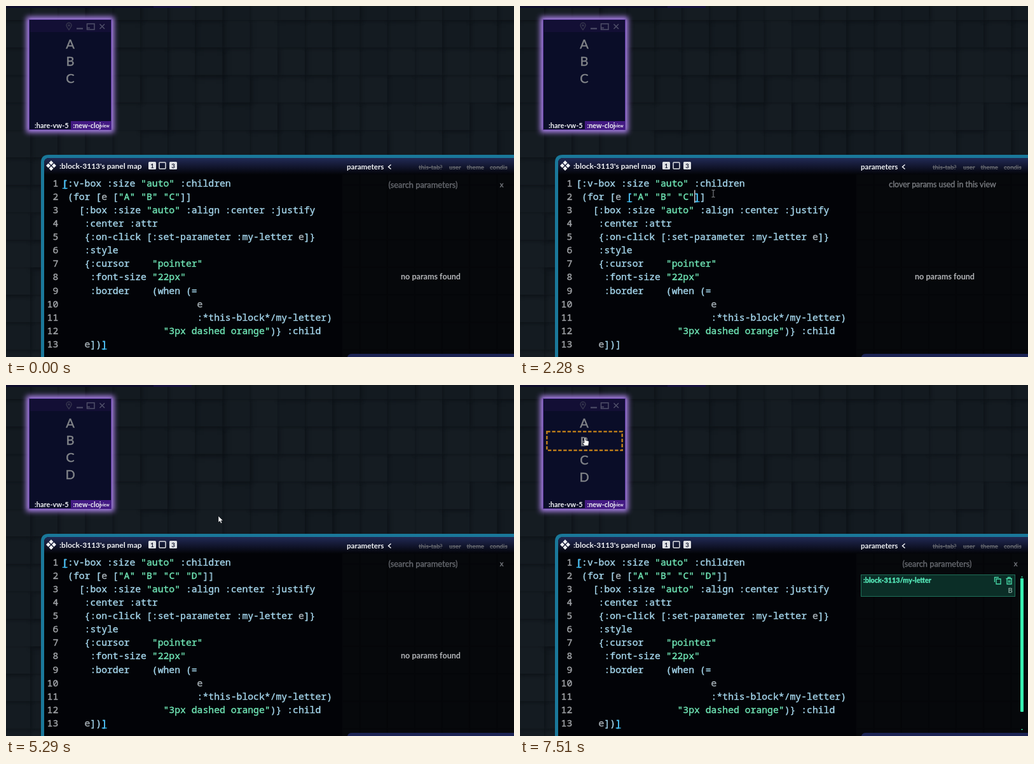
Recreate the animation shown at these times as an HTML page with a canvas. Size 799 by 552 pixels, loop 8000 ms.

```html
<!DOCTYPE html>
<html lang="en">
<head>
<meta charset="utf-8">
<title>Panel editor</title>
<style>
html, body { margin: 0; width: 100%; height: 100%; overflow: hidden; background: #141b21; }
canvas, svg { position: absolute; left: 0; top: 0; display: block; }
text { white-space: pre; font-family: Lato, sans-serif; color: #f0f2f5; fill: currentColor; }
tspan { fill: currentColor; }
.b { font-weight: 700; }
.mid { text-anchor: middle; }
.firm, .code text, .code tspan { stroke: currentColor; stroke-width: .4px; }
.code text { font: 500 14.75px "Noto Sans Mono", "DejaVu Sans Mono", monospace; color: #a5d6ec; }
.code .str { color: #70e6b6; }
.code .sym { color: #a9b3b9; }
.code .num { color: #a2a5a9; text-anchor: end; }
.code .mark text { color: #3cbcf4; }
.mark rect { fill: #3cbcf4; }
.letters text { font-size: 20px; color: #83868a; text-anchor: middle; }
.tabs text { font-size: 9.7px; font-weight: 700; color: #62656d; text-decoration: line-through; }
.glow { position: absolute; left: 36px; top: 21px; width: 128px; height: 172px; border: 1.5px solid #51308f;
  background: #0a0d28; box-shadow: 0 0 8px 4px #b086f0; }

.step { animation: 8s step-end infinite; }
.focus { animation-name: focus; }
.blur { animation-name: blur; }
@keyframes focus { 0% { opacity: 0 } 26.6% { opacity: 1 } 61.85% { opacity: 0 } }
@keyframes blur { 0% { opacity: 1 } 26.6% { opacity: 0 } 61.85% { opacity: 1 } }
@keyframes pair { 0% { opacity: 0 } 26.6% { opacity: 1 } 43.5% { opacity: 0 } }
@keyframes tail {
  0% { transform: none } 35.7% { transform: translateX(8.85px) }
  43.5% { transform: translateX(26.55px) } 48.3% { transform: translateX(35.4px) }
}
@keyframes caret {
  0% { transform: none; opacity: 0 } 26.6% { transform: none; opacity: 1 }
  33.5% { transform: none; opacity: 0 } 35.7% { transform: translateX(8.85px); opacity: 1 }
  42.3% { transform: translateX(8.85px); opacity: 0 } 43.5% { transform: translateX(17.7px); opacity: 1 }
  48.3% { transform: translateX(26.55px); opacity: 1 } 55.1% { transform: translateX(26.55px); opacity: 0 }
}
@keyframes quotes { 0% { opacity: 0 } 43.5% { opacity: 1 } 48.3% { opacity: 0 } }
@keyframes typed { 0% { opacity: 0 } 48.3% { opacity: 1 } }
@keyframes fourth { 0% { opacity: 0 } 66.1% { opacity: 1 } }
@keyframes picked { 0% { opacity: 0 } 92.5% { opacity: 1 } }
@keyframes unpicked { 0% { opacity: 1 } 92.5% { opacity: 0 } }
@keyframes nudge { 0% { transform: none } 92.5% { transform: translateY(2px) } }
@keyframes push { 0% { transform: none } 92.5% { transform: translateY(4px) } }

.mouse { animation: mouse 8s infinite linear; }
@keyframes mouse {
  0%, 9.1% { transform: translate(782px, 408px); animation-timing-function: ease-out }
  11.5%, 15% { transform: translate(427px, 149px); animation-timing-function: ease-in }
  18% { transform: translate(300px, 205px) }
  20% { transform: translate(226px, 266px) }
  21.9% { transform: translate(248px, 295px); animation-timing-function: ease-out }
  23.5%, 27.2% { transform: translate(277px, 300px) }
  28.5%, 58.3% { transform: translate(304px, 295px); animation-timing-function: ease-in-out }
  61.2%, 74.1% { transform: translate(334px, 206px) }
  74.6%, 79.3% { transform: translate(337px, 215px); animation-timing-function: ease-in-out }
  82.2%, 82.6% { transform: translate(159px, 64px); animation-timing-function: ease-out }
  86.6%, 100% { transform: translate(102px, 83px) }
}
@keyframes arrow { 0% { opacity: 0 } 9.1% { opacity: 1 } 20% { opacity: 0 } 59.7% { opacity: 1 } 83% { opacity: 0 } }
@keyframes beam { 0% { opacity: 0 } 20% { opacity: 1 } 59.7% { opacity: 0 } }
@keyframes hand { 0% { opacity: 0 } 83% { opacity: 1 } }
@keyframes click {
  0% { opacity: 0 } 13.7% { opacity: 1 } 15.6% { opacity: 0 } 25.7% { opacity: 1 } 27.2% { opacity: 0 }
  61.85% { opacity: 1 } 64% { opacity: 0 } 89.85% { opacity: 1 } 91.9% { opacity: 0 }
}
</style>
</head>
<body>
<canvas id="wall" width="799" height="552"></canvas>
<div class="glow"></div>
<svg width="799" height="552" viewBox="0 0 799 552">
  <defs>
    <linearGradient id="bar" x2="0" y2="1">
      <stop stop-color="#222a55"/><stop offset=".55" stop-color="#11152c"/><stop offset="1" stop-color="#030408"/>
    </linearGradient>
  </defs>
  <rect width="292" height="3" fill="#0d0d2b"/>
  <rect x="232" width="60" height="3" fill="#16123f"/>

  <!-- small view -->
  <rect x="38" y="23" width="127" height="18" fill="#130f35"/>
  <g fill="none" stroke="#50506a" stroke-width="1.5">
    <path d="M99 37.5Q95 32 95 30.5A4 4 0 0 1 103 30.5Q103 32 99 37.5Z" stroke="#35354d"/>
    <circle cx="99" cy="30.5" r="1" stroke="#35354d"/>
    <path d="M111 35.5H121" stroke-width="2"/>
    <path d="M127.5 28H139V37H127.5ZM128 34.5H132"/>
    <path d="M147.5 28.5L155 36M155 28.5L147.5 36"/>
  </g>
  <g class="letters">
    <text x="101" y="67" class="firm">A</text>
    <text x="101" y="94" class="firm step" style="animation-name:nudge">B</text>
    <g class="step" style="animation-name:push">
      <text x="101" y="121" class="firm">C</text>
      <text x="101" y="148" class="firm step" style="animation-name:fourth">D</text>
    </g>
  </g>
  <rect class="step" style="animation-name:picked" x="42.3" y="73.3" width="118.4" height="29.4" fill="none"
    stroke="#b87a1a" stroke-width="2.6" stroke-dasharray="5.4 2.7"/>
  <rect x="102" y="181" width="63" height="14" fill="#431a83"/>
  <text x="45" y="192" class="b" font-size="11">:hare-vw-5</text>
  <text x="105.5" y="192" class="b" font-size="10.8">:new-cloj</text>
  <text x="149" y="191" class="b" font-size="6.5">view</text>

  <!-- editor panel -->
  <path d="M55 552V246Q55 234 67 234H799V552Z" fill="#1a789a"/>
  <path d="M60 552V247Q60 239 68 239H799V552Z" fill="#020307"/>
  <rect x="529" y="265" width="270" height="287" fill="#06080b"/>
  <g id="texture" fill="none" stroke="#030405" stroke-width="2"></g>
  <path d="M60 265V247Q60 239 68 239H799V265Z" fill="url(#bar)"/>
  <path d="M71 243l3.5 3.5-3.5 3.5-3.5-3.5zM71 252l3.5 3.5-3.5 3.5-3.5-3.5zM66.5 247.5l3.5 3.5-3.5 3.5-3.5-3.5zM75.5 247.5l3.5 3.5-3.5 3.5-3.5-3.5z" fill="#f0f2f5"/>
  <text x="84" y="255.5" class="b" font-size="12">:block-3113's panel map</text>
  <g fill="#dfe1e5">
    <rect x="224" y="245" width="12" height="12" rx="1.5"/>
    <rect x="241" y="246" width="10" height="10" rx="1" fill="none" stroke="#dfe1e5" stroke-width="1.5"/>
    <rect x="257" y="245" width="12" height="12" rx="1.5"/>
  </g>
  <text x="230" y="254.5" class="b mid" font-size="9.5" style="color:#11152c">1</text>
  <text x="263" y="254.5" class="b mid" font-size="9.5" style="color:#11152c">3</text>
  <g class="code" id="code"></g>

  <!-- parameters -->
  <text x="536" y="256.5" class="b" font-size="11.6">parameters</text>
  <path d="M605.5 249.5L601.5 253L605.5 256.5" fill="none" stroke="#f0f2f5" stroke-width="1.5"/>
  <g class="tabs">
    <text x="649" y="257">this-tab?</text><text x="697" y="257">user</text>
    <text x="724.5" y="257">theme</text><text x="761" y="257">condis</text>
  </g>
  <g class="step blur">
    <text x="656" y="285.5" class="mid firm" font-size="12.8" style="color:#65686e">(search parameters)</text>
    <text x="779.5" y="285" class="mid firm" font-size="11.5" style="color:#73767c">x</text>
  </g>
  <text x="664.5" y="285" class="mid firm step focus" font-size="12.4" style="color:#777a7f">clover params used in this view</text>
  <text x="668" y="429.5" class="b mid step" font-size="12.6" style="color:#b2b4b7;animation-name:unpicked">no params found</text>
  <g class="step" style="animation-name:picked">
    <rect x="536.5" y="298.5" width="242" height="34" fill="#0b2e27" stroke="#1f7059"/>
    <text x="540" y="311" class="b firm" font-size="10.8" style="color:#55e8b8">:block-3113/my-letter</text>
    <path d="M746.5 310V302.5H753M749 305H756V313H749ZM764.5 304.5H774M767.5 304V302.5H771V304M766 305V313H773V305M768.5 307V311M770.5 307V311"
      fill="none" stroke="#48dcaa" stroke-width="1.3"/>
    <text x="771" y="327" class="b mid" font-size="11" style="color:#7f9f96">B</text>
    <rect x="787" y="304" width="5" height="210" rx="1" fill="#38eeb0"/>
    <path d="M788 302.5L789.5 300.5L791 302.5ZM788 541L789.5 543L791 541Z" fill="#38eeb0"/>
  </g>
  <path d="M537 552Q538 547 544 547H799V552Z" fill="#1c2455"/>

  <g class="mouse">
    <circle class="step" style="animation-name:click" r="7" fill="#a09c10"/>
    <path class="step" style="animation-name:arrow" d="M0 0V10L2.3 8L4 11.5L5.8 10.7L4.2 7.3H7.3Z"
      fill="#fff" stroke="#101318" stroke-width=".6"/>
    <path class="step" style="animation-name:beam" d="M-2.5 -5.5H-.7L0 -5L.7 -5.5H2.5M0 -5V5M-2.5 5.5H-.7L0 5L.7 5.5H2.5"
      fill="none" stroke="#8f9296" stroke-width="1"/>
    <path class="step" style="animation-name:hand" d="M-1 0Q.2 -1 1.3 0V4L5.5 5Q6.5 5.3 6.3 7L5.5 12.5H-.5L-3.5 8.5Q-3.5 7 -1 8Z"
      fill="#fff" stroke="#101318" stroke-width=".6"/>
  </g>
</svg>
<script>
const CELL = 8.85, LEFT = 88.2, LEADING = 21.07;
const colX = col => LEFT + col * CELL;
const rowY = row => 284 + row * LEADING;

const lines = [
  '[:v-box :size "auto" :children',
  ' (for [e ["A" "B" "C"',
  '   [:box :size "auto" :align :center :justify',
  '    :center :attr',
  '    {:on-click [:set-parameter :my-letter e]}',
  '    :style',
  '    {:cursor    "pointer"',
  '     :font-size "22px"',
  '     :border    (when (=',
  ' '.repeat(24) + 'e',
  ' '.repeat(24) + ':*this-block*/my-letter)',
  ' '.repeat(18) + '"3px dashed orange")} :child',
  '    e])]'
];

const paint = source => source
  .split(/("[^"]*"|\be\b)/)
  .map((part, i) => i % 2 ? `<tspan class="${part === 'e' ? 'sym' : 'str'}">${part}</tspan>` : part)
  .join('');
const write = (col, row, source) => `<text x="${colX(col)}" y="${rowY(row)}">${paint(source)}</text>`;
const mark = (col, row, char) =>
  `<g class="mark">${write(col, row, char)}<rect x="${colX(col) + 0.5}" y="${rowY(row) + 2}" width="8" height="1.3"/></g>`;
const step = (name, content) => `<g class="step" style="animation-name:${name}">${content}</g>`;

document.getElementById('code').innerHTML =
  lines.map((line, row) => {
    const indent = line.search(/\S/);
    return `<text class="num" x="82.3" y="${rowY(row)}">${row + 1}</text>` + write(indent, row, line.trim());
  }).join('') +
  step('quotes', write(22, 1, '""')) +
  step('typed', write(22, 1, '"D"')) +
  step('tail', write(21, 1, ']]') + step('pair', mark(21, 1, ']'))) +
  step('pair', mark(9, 1, '[')) +
  step('blur', mark(0, 0, '[') + mark(7, 12, ']')) +
  step('caret', `<rect x="${colX(21)}" y="289.5" width="1.5" height="20" fill="#c9ced3"/>`);

// Uneven wall of square tiles, each casting a shadow to the lower right
const TILE = 43.2;
let seed = 11;
const random = () => (seed = seed * 16807 % 2147483647) / 2147483647;
const ctx = document.getElementById('wall').getContext('2d');
for (let row = 13; row >= 0; row--) {
  for (let col = 19; col >= 0; col--) {
    const shade = random() * 3 - 1.5;
    const depth = random();
    ctx.fillStyle = `rgb(${20 + shade}, ${27 + shade}, ${33 + shade})`;
    ctx.shadowColor = `rgba(5, 8, 12, ${0.25 + depth * 0.45})`;
    ctx.shadowBlur = 3 + depth * 5;
    ctx.shadowOffsetX = ctx.shadowOffsetY = 1 + depth;
    ctx.fillRect(col * TILE - 5, row * TILE - 21, TILE, TILE);
  }
}

let seams = '';
for (let x = 556.5; x < 799; x += TILE) seams += `M${x} 265V552`;
for (let y = 281.4; y < 552; y += TILE) seams += `M530 ${y}H799`;
document.getElementById('texture').innerHTML = `<path d="${seams}" opacity=".4"/>`;
</script>
</body>
</html>
```
